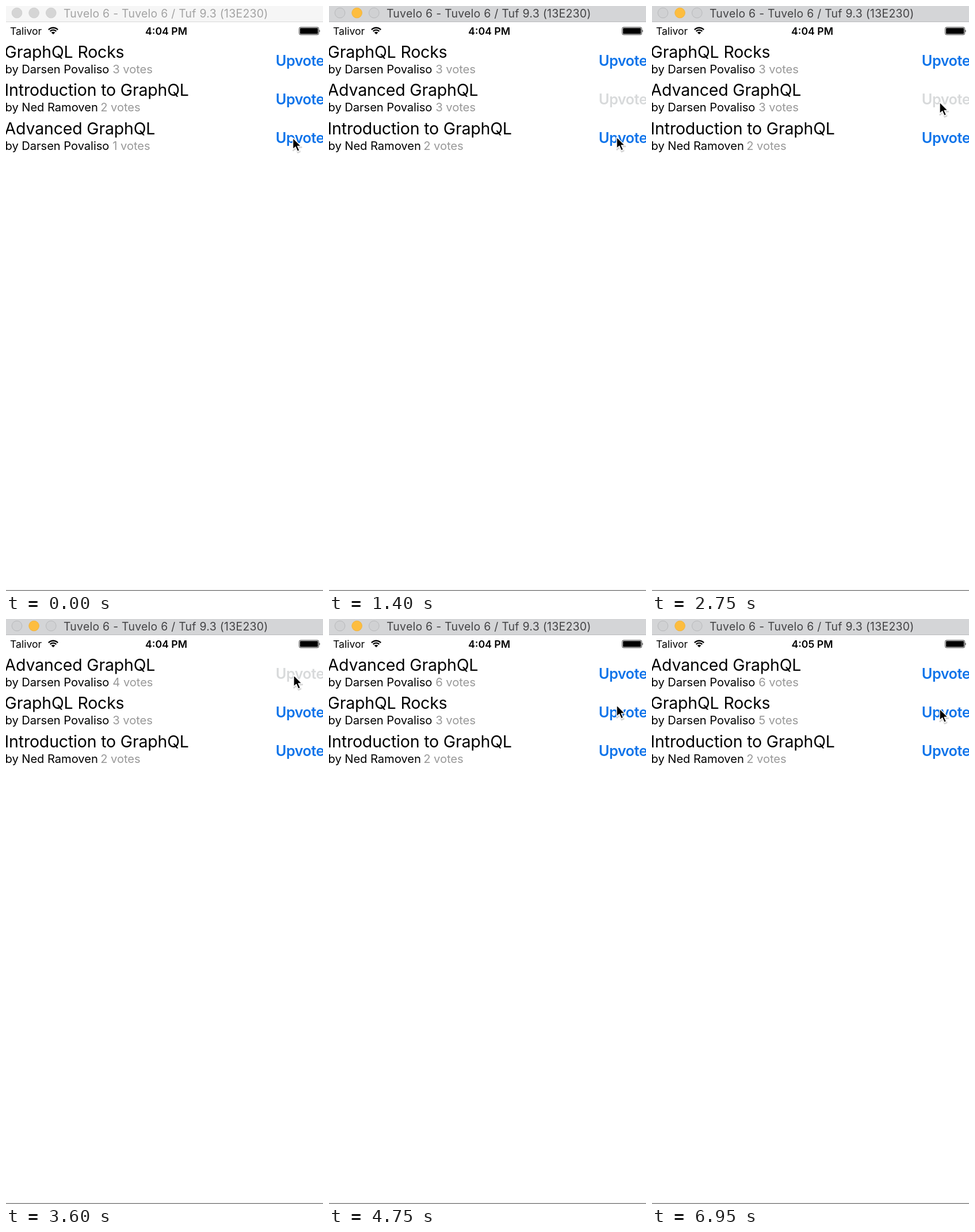
Animation, 551 px wide and 1016 px high, one loop 7000 ms. Source, as an HTML page:

```html
<!DOCTYPE html>
<html lang="en">
<head>
<meta charset="utf-8">
<title>Upvote list</title>
<style>
  html, body { margin: 0; width: 100%; height: 100%; overflow: hidden; background: #fff; }
  svg { display: block; width: 551px; height: 1016px; font-family: Inter, "Liberation Sans", sans-serif; }
  text { white-space: pre; }
  .bar { font-size: 19.4px; letter-spacing: 0.28px; }
  .status { font-size: 17.6px; }
  .clock { font-size: 17.7px; font-weight: 600; text-anchor: middle; }
  .title { font-size: 28.5px; letter-spacing: -0.18px; }
  .by { font-size: 20.2px; letter-spacing: -0.07px; }
  .votes { fill: #999; }
  .button { font-size: 25.3px; font-weight: 600; letter-spacing: -0.5px; }
</style>
</head>
<body>
<svg id="stage" viewBox="0 0 551 1016">
  <rect width="551" height="1016" fill="#fff"/>
  <rect id="bar" width="551" height="27"/>
  <rect id="edge" y="27" width="551" height="1"/>
  <g id="lights"></g>
  <text id="name" class="bar" x="100" y="19.5">Tuvelo 6 - Tuvelo 6 / Tuf 9.3 (13E230)</text>

  <text class="status" x="7" y="49.5">Talivor</text>
  <g id="wifi" fill="none" stroke="#000" stroke-width="2.3"></g>
  <text id="clock" class="clock" x="278.5" y="49.5"></text>
  <rect x="509.6" y="36.9" width="34" height="13" rx="2.5" fill="#fff" stroke="#000" stroke-width=".8"/>
  <rect x="511" y="38.3" width="31.2" height="10.2" rx="1.3"/>
  <path d="M544.6 41q2 2.4 0 4.8z"/>

  <g id="list"></g>
  <rect y="1014.5" width="551" height="1.5" fill="#808080"/>
  <g id="cursor">
    <path d="M0 0V20L4.6 15.8 8 23.6 11.6 22 8.2 14.4H14.4Z" transform="translate(.6 2)"
          fill="#000" opacity=".16" stroke="#000" stroke-width="2.5" stroke-linejoin="round"/>
    <path d="M0 0V20L4.6 15.8 8 23.6 11.6 22 8.2 14.4H14.4Z"
          fill="#000" stroke="#fff" stroke-width="1.4" stroke-linejoin="round"/>
  </g>
</svg>
<script>
const LOOP = 7000, ROW = 66.7, ACTIVE_AT = 350, MINUTE_AT = 6500;
const BLUE = '#0f74ea', GREY = '#d8dadb';
const $ = id => document.getElementById(id);

function add(parent, tag, attrs, text = '') {
  const el = document.createElementNS('http://www.w3.org/2000/svg', tag);
  for (const key in attrs) el.setAttribute(key, attrs[key]);
  el.textContent = text;
  return parent.appendChild(el);
}

const posts = [
  { title: 'GraphQL Rocks', author: 'Darsen Povaliso', votes: 3, votesX: 185.3 },
  { title: 'Introduction to GraphQL', author: 'Ned Ramoven', votes: 2, votesX: 164.2 },
  { title: 'Advanced GraphQL', author: 'Darsen Povaliso', votes: 1, votesX: 185.3 }
];

// post index, tap, vote counted, button enabled again
const taps = [
  [2, 450, 700, 800], [2, 950, 1250, 1600], [2, 2500, 2850, 3050],
  [2, 3500, 3700, 3850], [2, 3950, 4250, 4400],
  [0, 4900, 5150, 5250], [0, 5350, 5550, 5750]
];

// time, x, y of the pointer tip
const path = [
  [0, 498.6, 229], [200, 498.6, 229], [400, 500, 229], [1000, 500, 227.5],
  [1600, 500, 227.5], [2150, 500, 172.5], [2350, 500, 172.5], [2550, 500, 167],
  [3080, 500, 167], [3400, 500, 97.5], [4550, 500, 98.5],
  [4750, 500, 149.5], [4900, 500, 156], [LOOP, 500, 156]
];

const lights = [19, 48.6, 78.3].map(cx => add($('lights'), 'circle', { cx, cy: 12, r: 8.8 }));

for (const r of [11.3, 7.4]) {
  const dx = r * .72, y = 49 - r * .69;
  add($('wifi'), 'path', { d: `M${82 - dx} ${y}A${r} ${r} 0 0 1 ${82 + dx} ${y}` });
}
add($('wifi'), 'path', { d: 'M82 49.3L78.7 46.1A4.6 4.6 0 0 1 85.3 46.1Z', fill: '#000', stroke: 'none' });

for (const post of posts) {
  post.g = add($('list'), 'g', {});
  add(post.g, 'text', { class: 'title', x: -2.4, y: 89.5 }, post.title);
  add(post.g, 'text', { class: 'by', x: -1.5, y: 116.5 }, 'by ' + post.author);
  post.count = add(post.g, 'text', { class: 'by votes', x: post.votesX, y: 116.5 });
  post.button = add(post.g, 'text', { class: 'button', x: 468.8, y: 104.2 }, 'Upvote');
}

function pointer(t) {
  const i = path.findIndex(p => p[0] > t);
  const [t0, x0, y0] = path[i - 1], [t1, x1, y1] = path[i];
  const u = (t - t0) / (t1 - t0), e = u * u * (3 - 2 * u);
  return [x0 + (x1 - x0) * e, y0 + (y1 - y0) * e];
}

function drawBar(active) {
  $('bar').setAttribute('fill', active ? '#d4d5d7' : '#f6f6f6');
  $('edge').setAttribute('fill', active ? '#b9babc' : '#d9d9d9');
  $('name').setAttribute('fill', active ? '#434345' : '#a3a3a3');
  lights.forEach((light, i) => {
    const amber = active && i === 1;
    light.setAttribute('fill', amber ? '#fdbd3f' : active ? '#d0d1d3' : '#d5d5d5');
    light.setAttribute('stroke', amber ? '#f0b440' : active ? '#b8b9bb' : '#d0d0d0');
  });
}

function drawList(t) {
  const state = posts.map((post, i) => {
    const mine = taps.filter(tap => tap[0] === i);
    return {
      post,
      votes: post.votes + mine.filter(tap => t >= tap[2]).length,
      busy: mine.some(tap => t >= tap[1] && t < tap[3])
    };
  });
  state.sort((a, b) => b.votes - a.votes);
  state.forEach(({ post, votes, busy }, row) => {
    post.g.setAttribute('transform', `translate(0 ${row * ROW})`);
    post.count.textContent = votes + ' votes';
    post.button.setAttribute('fill', busy ? GREY : BLUE);
  });
}

function draw(t) {
  drawBar(t >= ACTIVE_AT);
  drawList(t);
  $('clock').textContent = t < MINUTE_AT ? '4:04 PM' : '4:05 PM';
  $('cursor').setAttribute('transform', `translate(${pointer(t)})`);
}

const start = performance.now();
function tick() {
  draw(Math.max(0, performance.now() - start) % LOOP);
  requestAnimationFrame(tick);
}
tick();
</script>
</body>
</html>
```
